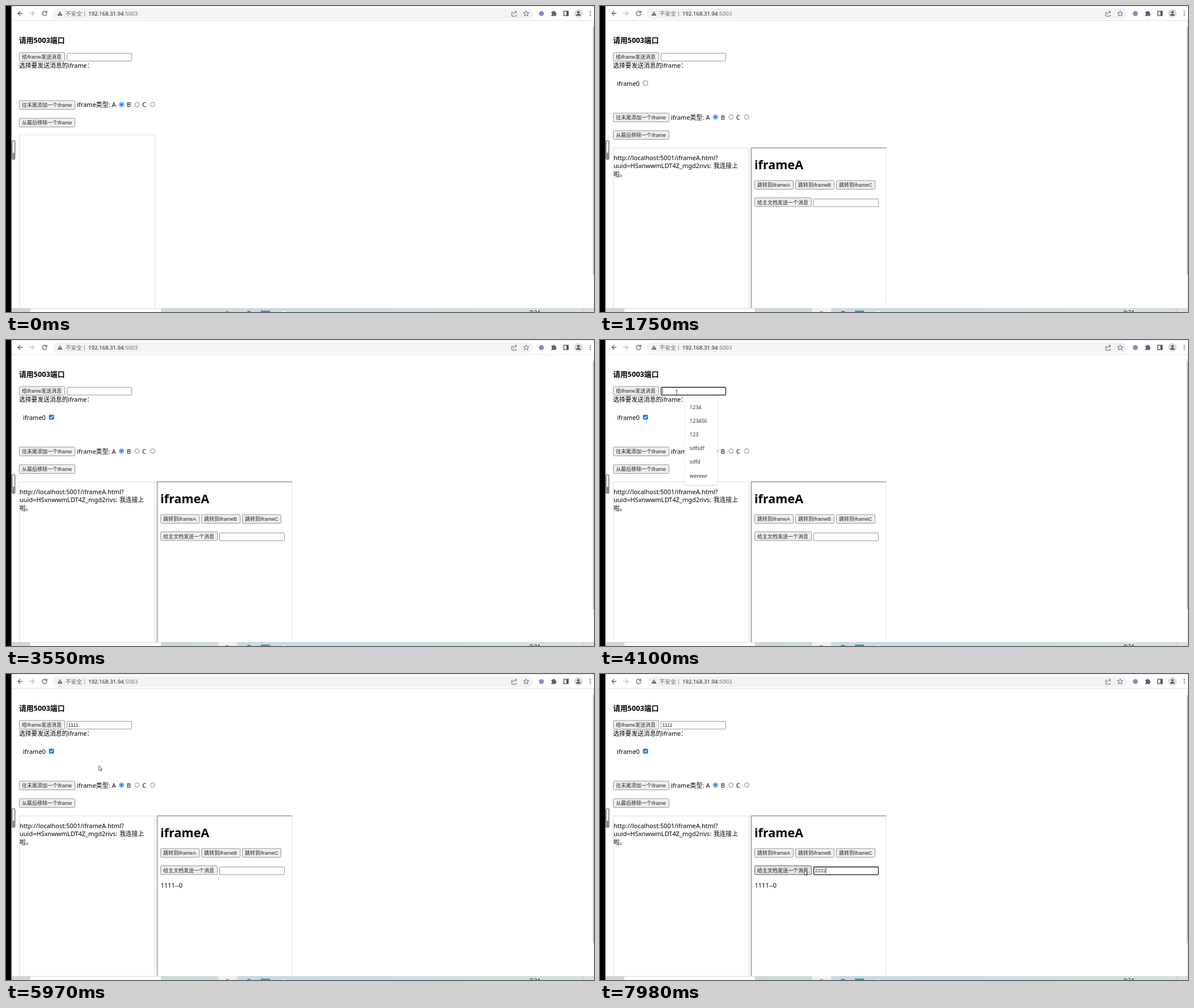
Animation of 1036 by 540 pixels, one loop 8000 ms. Source, as an HTML page:

```html
<!DOCTYPE html>
<html lang="zh-CN">
<head>
<meta charset="utf-8">
<title>iframe</title>
<style>
html, body { margin: 0; width: 100%; height: 100%; overflow: hidden; background: #fff; }
svg { display: block; width: 1036px; height: 540px; }
text { font: 11px "Noto Sans", "Noto Sans CJK SC", sans-serif; white-space: pre; }
.cjk { font-size: 10.8px; }
.ui { font: 9px "Liberation Sans", "Noto Sans CJK SC", sans-serif; fill: #222; }
.item { font-size: 9px; fill: #333; }
.url { font-size: 9.6px; }
.line { fill: none; stroke: #5f6368; stroke-width: 1.3; }

.shift { animation: shift 8s step-end infinite; }
@keyframes shift { 0% { transform: none; } 19%, 100% { transform: translateY(var(--dy)); } }

.pointer { animation: pointer 8s infinite; }
@keyframes pointer {
  0%, .875% { transform: translate(983px, 511px); animation-timing-function: steps(4, start); }
  4.21% { transform: translate(250px, 249px); }
  5.375% { transform: translate(250px, 249px); animation-timing-function: steps(5, start); }
  10.2% { transform: translate(98px, 218px); }
  11.125% { transform: translate(98px, 218px); animation-timing-function: steps(6, start); }
  16.975% { transform: translate(82px, 172px); }
  21% { transform: translate(82px, 172px); animation-timing-function: steps(8, start); }
  28.75% { transform: translate(361px, 292px); animation-timing-function: steps(6, start); }
  34.75% { transform: translate(66px, 134px); animation-timing-function: steps(3, start); }
  37.75% { transform: translate(82px, 133px); }
  42.375% { transform: translate(82px, 133px); animation-timing-function: steps(7, start); }
  49.225% { transform: translate(135px, 93px); }
  62.95% { transform: translate(135px, 93px); animation-timing-function: steps(4, start); }
  66.86% { transform: translate(77px, 92px); }
  71.75% { transform: translate(77px, 92px); animation-timing-function: steps(11, start); }
  82.34% { transform: translate(394.5px, 347px); }
  97.8% { transform: translate(394.5px, 347px); animation-timing-function: steps(3, start); }
  100% { transform: translate(360px, 346px); }
}
</style>
</head>
<body>
<svg id="stage" viewBox="0 0 1036 540"></svg>
<script>
const LOOP = 8000;

const rect = (x, y, w, h, fill, extra = '') =>
  `<rect x="${x}" y="${y}" width="${w}" height="${h}" fill="${fill}" ${extra}/>`;
const text = (x, y, value, cls = '', extra = '') =>
  `<text x="${x}" y="${y}" class="${cls}" ${extra}>${value}</text>`;
const line = (d, extra = '') => `<path class="line" d="${d}" ${extra}/>`;
const shifted = (dy, content) => `<g class="shift" style="--dy:${dy}px">${content}</g>`;

// Content visible only during "start-end" spans, in ms.
const during = (spans, content) => `<g data-on="${spans}" opacity="0">${content}</g>`;

function button(x, y, w, label, hover, press) {
  const face = (fill, stroke) =>
    rect(x + .5, y + .5, w - 1, 15.4, fill, `rx="1.8" stroke="${stroke}" stroke-width=".8"`);
  return face('#efefef', '#7c7c7c')
    + (hover ? during(hover, face('#e3e3e3', '#4f4f4f')) : '')
    + (press ? during(press, face('#f5f5f5', '#8d8d8d')) : '')
    + text(x + 5, y + 11.6, label, 'ui');
}

function input(x, y, focus) {
  return rect(x + .5, y + .5, 114, 13.6, '#fff', 'rx="1.2" stroke="#7c7c7c" stroke-width=".8"')
    + during(focus, rect(x + .7, y + .5, 113.8, 13.6, '#fff', 'rx="1.4" stroke="#181818" stroke-width="1.3"'));
}

const caret = (x, y) => rect(x, y - 8, .8, 10, '#333');

// Each key press replaces the previous text; the caret leaves at blur.
function typed(x, y, digit, times, blur) {
  return times.map((start, i) => {
    const last = i === times.length - 1;
    const value = text(x, y, digit.repeat(i + 1), 'ui');
    const mark = caret(x + 5 * (i + 1) - .8, y);
    return last
      ? during(`${start}-${LOOP}`, value) + during(`${start}-${blur}`, mark)
      : during(`${start}-${times[i + 1]}`, value + mark);
  }).join('');
}

function dropdown(spans, x, y, items, w = 57) {
  return during(spans, `<g transform="translate(${x} ${y})">
    <g filter="url(#shadow)">${rect(0, 0, w, 6.6 + 24.2 * items.length, '#fff', 'rx="2.5"')}
    <path d="M8.5 .5L14-4.5L19.5 .5z" fill="#fff"/></g>
    ${items.map((item, i) => text(8.3, 17.8 + 24.2 * i, item, 'item')).join('')}</g>`);
}

const radio = (x, on) => on
  ? `<circle cx="${x}" cy="174" r="3.9" fill="#fff" stroke="#0075ff" stroke-width="1"/><circle cx="${x}" cy="174" r="2.4" fill="#0075ff"/>`
  : `<circle cx="${x}" cy="174" r="3.9" fill="#fff" stroke="#767676" stroke-width=".9"/>`;

const toolbar = `
  ${rect(10, 0, 1026, 1, '#e8eaed')}${rect(10, 25, 1026, 1, '#dfe1e3')}
  ${rect(83, 4, 845, 19, '#f1f3f4', 'rx="9.5"')}
  ${line('M29 13H21M25 9L21 13L25 17')}
  ${line('M41 13H49M45.5 9L49.5 13L45.5 17', 'style="stroke:#bdc1c6"')}
  ${line('M71 10.5A4 4 0 1 0 72 13.6M72 8.5V11.5H69')}
  <path d="M95 9L99.5 17H90.5z" fill="#5f6368"/>${rect(94.5, 11.5, 1, 2.8, '#fff')}${rect(94.5, 15, 1, 1, '#fff')}
  ${text(105, 16.7, '不安全', 'url', 'fill="#5f6368"')}${rect(138, 9, 1, 9, '#9aa0a6')}
  ${text(145, 16.5, '192.168.31.94<tspan fill="#6b6f74">:5003</tspan>', 'url', 'fill="#202124"')}
  ${line('M893 11H891V18H899V15.5M893.5 15Q894 10.5 899 10.5M897 8L899.7 10.5L897 13', 'style="stroke-width:1"')}
  ${line('M916.5 8.5L917.9 11.7L921.3 12L918.7 14.2L919.5 17.6L916.5 15.8L913.5 17.6L914.3 14.2L911.7 12L915.1 11.7z', 'style="stroke-width:1"')}
  <circle cx="943.3" cy="13.3" r="4.4" fill="#8f87c4"/>
  <path d="M961 10H963.3A1.6 1.6 0 0 1 966.5 10H968.5V12.3A1.6 1.6 0 0 1 968.5 15.5V18H966A1.6 1.6 0 0 0 963 18H961V15.4A1.5 1.5 0 0 0 961 12.5z" fill="#5f6368"/>
  ${rect(982.7, 9.2, 8, 7.8, 'none', 'stroke="#4a4d51" stroke-width="1.3"')}${rect(987.5, 9, 3.5, 8, '#4a4d51')}
  <circle cx="1008.5" cy="13" r="7.5" fill="#d8dbdf"/><circle cx="1008.5" cy="11" r="2.1" fill="#4a4d51"/>
  <path d="M1004.5 17Q1004.5 14 1008.5 14T1012.5 17z" fill="#4a4d51"/>
  ${[9.5, 13, 16.5].map(y => `<circle cx="1029.5" cy="${y}" r="1.1" fill="#5f6368"/>`).join('')}`;

const header = `
  ${text(23, 65.3, '请用5003端口', '', 'style="font-size:12.8px;font-weight:700"')}
  ${button(23, 81.5, 81, '给iframe发送消息', '5192-5740', '5500-5580')}
  ${input(107, 83, '3860-5500')}
  ${text(23, 109, '选择要发送消息的iframe：', 'cjk')}
  ${during('3860-4580', caret(110, 93.3))}
  ${typed(109.5, 93.3, '1', [4580, 4800, 4878, 4956], 5500)}`;

const controls = shifted(22, `
  ${button(23, 166.5, 99, '往末尾添加一个iframe', '1202-1520', '1440-1520')}
  ${radio(203.5, true)}${radio(231)}${radio(258.5)}
  ${button(23, 197.5, 99, '从最后移除一个iframe', '890-1046')}`)
  + shifted(22.7, text(125, 178.3, 'iframe类型: A') + text(213, 178.3, 'B') + text(240, 178.3, 'C'));

const log = shifted(23, rect(23.5, 227.5, 239, 330, 'none', 'stroke="#dedede"'))
  + during('1680-8000',
    text(24, 272, 'http://localhost:5001/iframeA.html?')
    + text(24, 286.2, 'uuid=HSxnwwmLDT4Z_mgd2rivs:')
    + text(200, 286.2, '我连接上', 'cjk') + text(24, 300.5, '啦。', 'cjk'));

const checkbox = during('1520-8000',
  text(30, 140.5, 'iframe0')
  + rect(76.3, 132.3, 7.6, 7.6, '#fff', 'rx="1.4" stroke="#767676" stroke-width=".9"'))
  + during('3230-8000', rect(75.9, 131.9, 8.4, 8.4, '#0075ff', 'rx="1.4"')
  + '<path d="M77.7 136.2L79.4 138L82.6 134" fill="none" stroke="#fff" stroke-width="1.3"/>');

const frame = during('1520-8000', `
  <path d="M503.8 250V540" stroke="#e6e6e6"/>
  <path d="M266.4 540V250.3H504.5" fill="none" stroke="#858585" stroke-width="1.3"/>`)
  + during('1600-8000', `
  ${text(272, 288, 'iframeA', '', 'style="font-size:21.6px;font-weight:700"')}
  ${['A', 'B', 'C'].map((name, i) => button(272 + 72 * i, 307.5, 69, '跳转到iframe' + name)).join('')}
  ${button(272, 338, 101, '给主文档发送一个消息', '7883-8000')}
  ${input(376, 340, '6510-8000')}`)
  + during('5580-8000', text(272.5, 377, '1111--0'))
  + during('6510-7150', caret(379, 350))
  + typed(378.5, 350, '2', [7440, 7590, 7668, 7746], LOOP);

const recent = ['1234', '123456', '123', 'sdfsdf', 'sdfd', 'werewr'];
const dropdowns =
  dropdown('4030-4580', 149.8, 103.8, recent)
  + dropdown('4580-4800', 149.8, 103.8, ['1234', '123456', '123', '12'])
  + dropdown('6590-7440', 418.3, 360.8, recent)
  + dropdown('7440-7590', 418.3, 360.8, ['2342'], 48.5);

const taskbar = `
  ${rect(10, 533, 1026, 7, 'url(#bar)')}${rect(43, 534, 230, 6, '#fff')}
  ${during('0-1440', rect(508, 533, 33, 7, '#eef2f4'))}
  ${during('1440-8000', rect(374, 533, 33, 7, '#eef2f4'))}
  <circle cx="390" cy="543" r="4.5" fill="#858585"/>
  <circle cx="428" cy="542" r="4" fill="#2b83c4"/>
  ${rect(449, 537.5, 16, 3, '#2499d6')}
  <circle cx="490" cy="543" r="5" fill="#f3f5f5"/>
  ${text(923, 544.3, '9:34', '', 'style="font-size:9px"')}${rect(1016, 534, 1, 6, '#b9c3c7')}`;

const edges = `
  ${rect(0, 0, 9.5, 540, '#000')}
  ${rect(10.7, 237.5, 5, 33, '#fff', 'rx="2" stroke="#585858" stroke-width="1.2"')}
  ${rect(12, 259, 2.6, 10.5, '#668078')}
  ${rect(1034, 26, 2, 507, '#f1f1f1')}${rect(1034, 37, 2, 438, '#c1c1c1')}
  ${during('0-1520', rect(1034, 475, 2, 20, '#c1c1c1'))}`;

const pointer = `<g class="pointer">
  ${during('0-3860 5036-6433 7824-8000',
    '<path d="M0 0V8.8L2 7L3.4 10L4.8 9.4L3.4 6.5H6z" fill="#fff" stroke="#222" stroke-width=".8"/>')}
  ${during('3860-5036 6433-7824',
    '<path d="M-1.7-4.3H1.7M0-4.3V4.3M-1.7 4.3H1.7" fill="none" stroke="#333" stroke-width=".9"/>')}</g>`;

const stage = document.getElementById('stage');
stage.innerHTML = `<defs>
  <linearGradient id="bar"><stop stop-color="#d0d5d5"/><stop offset=".5" stop-color="#cbdbe2"/><stop offset="1" stop-color="#d6dfe2"/></linearGradient>
  <filter id="shadow" x="-20%" y="-20%" width="140%" height="140%"><feDropShadow dx="0" dy=".5" stdDeviation="1" flood-opacity=".32"/></filter>
  </defs>` + toolbar + header + controls + log + checkbox + frame + dropdowns + edges + taskbar + pointer;

for (const el of stage.querySelectorAll('[data-on]')) {
  const frames = [{ opacity: 0, offset: 0 }];
  for (const span of el.dataset.on.split(' ')) {
    const [start, end] = span.split('-').map(Number);
    frames.push({ opacity: 1, offset: start / LOOP });
    frames.push({ opacity: end === LOOP ? 1 : 0, offset: end / LOOP });
  }
  el.animate(frames.map(f => ({ ...f, easing: 'step-end' })), { duration: LOOP, iterations: Infinity });
}
</script>
</body>
</html>
```
